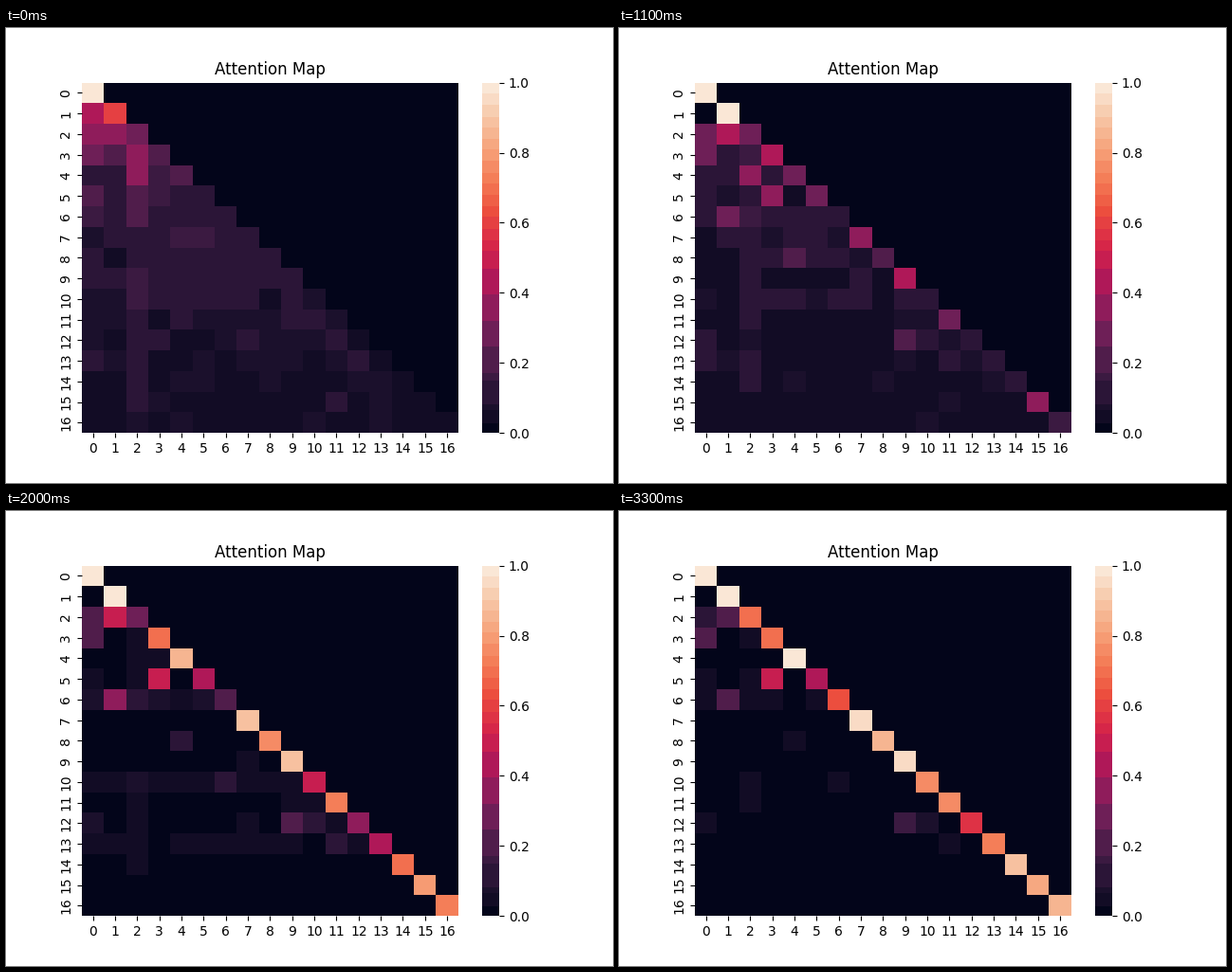
Write a matplotlib script that moves like this. It is 640 px wide and 480 px high and loops after 3400 ms.

```python
import numpy as np
import matplotlib.pyplot as plt
from matplotlib.animation import FuncAnimation
from matplotlib.colors import LinearSegmentedColormap, ListedColormap

plt.rcParams["font.family"] = "DejaVu Sans"

SIZE = 17
FRAMES, INTERVAL = 34, 100
SETTLED = 3.1  # seconds

# Rows 1 to 16: when self-attention is half grown (seconds), and its final weight.
ONSET = [0.25, 2.75, 1.1, 1.55, 1.05, 2.4, 1.3, 1.5,
         1.2, 1.88, 1.3, 1.87, 1.9, 1.68, 1.24, 1.57]
FINAL = [1, .82, .70, .99, .41, .68, .94, .87,
         .94, .78, .77, .56, .74, .88, .83, .85]
GROWTH_WIDTH = 0.27

# (row, column): share of the row's other attention that the link ends up with.
LINKS = {(2, 1): .70, (3, 0): .78, (5, 3): .80, (6, 1): .51, (8, 4): .42,
         (9, 7): .30, (10, 6): .20, (12, 0): .13, (12, 9): .36,
         (12, 10): .16, (13, 11): .20}
LINK_TIME = 2.2

rng = np.random.default_rng(4)
SHARES = np.exp(rng.normal(0, 0.2, (SIZE, SIZE)))
SHARES[3:, 2] *= 1.5


def banded_colormap():
    anchors = ["#03051a", "#221331", "#451c47", "#6a1f56", "#921c5b", "#b91657",
               "#d92847", "#ed503e", "#f47d57", "#f6a47c", "#f7c9aa", "#faebdd"]
    smooth = LinearSegmentedColormap.from_list("smooth", anchors)
    # Wide bands in the dark half, narrow ones in the bright half.
    edges = np.r_[0, .027, .065, .082, .147, np.linspace(.17, .47, 5),
                  np.linspace(.52, .97, 15), 1]
    middles = (edges[:-1] + edges[1:]) / 2
    middles[0] = 0
    bands = np.searchsorted(edges[1:-1], np.linspace(0, 1, 256), side="right")
    return ListedColormap(smooth(middles[bands]))


def smoothstep(u):
    u = min(u, 1)
    return u * u * (3 - 2 * u)


def self_weight(row, t):
    start, final = 0.85 / (row + 1), FINAL[row - 1]
    growth = 1 / (1 + np.exp((ONSET[row - 1] - t) / GROWTH_WIDTH))
    return start + (final - start) * growth


def attention(frame):
    """Rows sum to one: self-attention first, then links, then the rest."""
    t = min(frame * INTERVAL / 1000, SETTLED)
    ramp = smoothstep(t / LINK_TIME)
    grid = np.zeros((SIZE, SIZE))
    grid[0, 0] = 1
    for row in range(1, SIZE):
        share = SHARES[row, :row] / SHARES[row, :row].sum()
        links = [col for col in range(row) if (row, col) in LINKS]
        for col in links:
            share[col] = 1 / row + (LINKS[row, col] - 1 / row) * ramp
        rest = [col for col in range(row) if col not in links]
        share[rest] *= (1 - share[links].sum()) / share[rest].sum()
        grid[row, row] = self_weight(row, t)
        grid[row, :row] = (1 - grid[row, row]) * share
    return grid


fig, ax = plt.subplots(figsize=(6.4, 4.8), dpi=100)
mesh = ax.pcolormesh(attention(0), cmap=banded_colormap(), vmin=0, vmax=1)
ax.set(xlim=(0, SIZE), ylim=(SIZE, 0))
bar = fig.colorbar(mesh, ax=ax, ticks=np.linspace(0, 1, 6))
bar.outline.set_linewidth(0)

centres = np.arange(SIZE) + 0.5
ax.set_xticks(centres, range(SIZE))
ax.set_yticks(centres, range(SIZE), rotation="vertical", va="center")
ax.spines[:].set_visible(False)
ax.set_title("Attention Map")


def update(frame):
    mesh.set_array(attention(frame))
    return [mesh]


anim = FuncAnimation(fig, update, frames=FRAMES, interval=INTERVAL,
                     repeat=True, repeat_delay=0)
plt.show()
```
